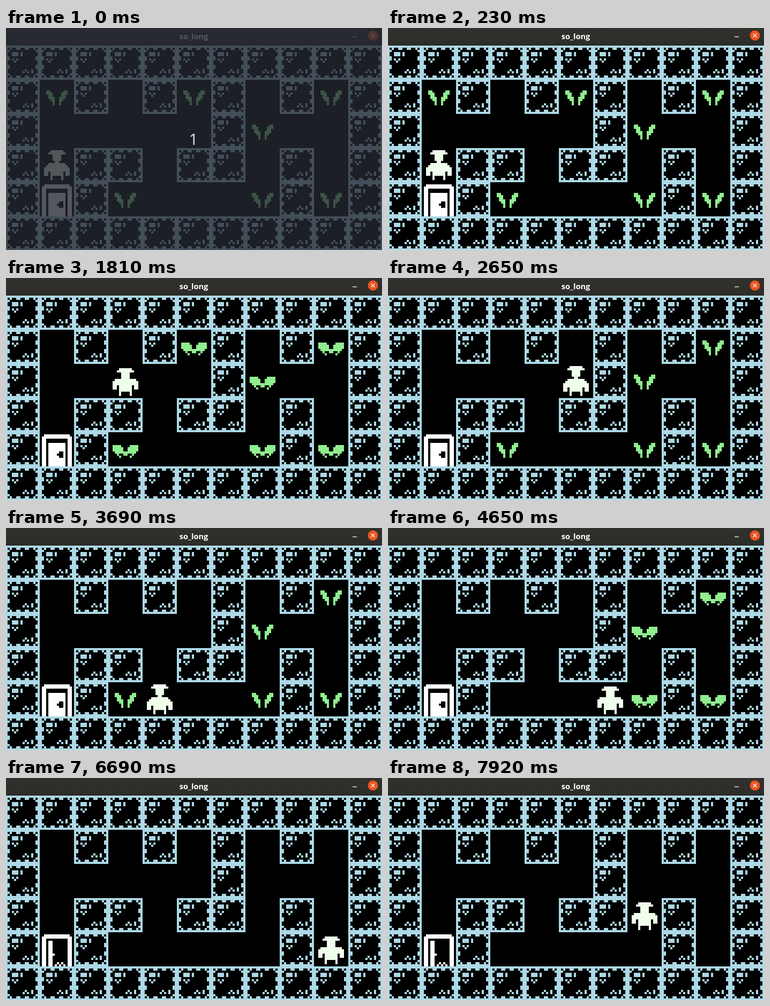
An HTML page with a canvas that plays this animation: 702 by 416 pixels, repeating every 8 s.

```html
<!DOCTYPE html>
<html lang="en">
<head>
<meta charset="utf-8">
<title>so_long</title>
<style>
  html, body { margin: 0; width: 702px; height: 416px; overflow: hidden; background: #000; }
  #stage { position: relative; width: 702px; height: 416px; overflow: hidden; }
  #stage > * { position: absolute; }
  canvas { left: 0; top: 0; }
  #bar { left: 0; top: 0; width: 702px; height: 33px; background: linear-gradient(#32312d, #2c2c29); }
  #title { left: 0; top: 5px; width: 701px; text-align: center; color: #fff;
    font: bold 14.6px/20px "Open Sans", "Noto Sans", sans-serif; }
  #controls { left: 640px; top: 0; }
  #dim { inset: 0; background: rgba(36, 40, 49, .78); }
  #count { left: 0; top: 188px; width: 700px; text-align: center; color: #d6d8da;
    font: 29px/40px "Noto Sans", sans-serif; }
</style>
</head>
<body>
<div id="stage">
  <canvas width="702" height="416"></canvas>
  <div id="bar"></div>
  <div id="title">so_long</div>
  <svg id="controls" width="62" height="33" fill="none" stroke="#fff">
    <path d="M7 16.5h8" stroke-width="1.3"/>
    <circle cx="45" cy="14" r="9.5" fill="#e95420" stroke="none"/>
    <path d="M41.5 10.5l7 7m0-7l-7 7" stroke-width="1.3"/>
  </svg>
  <div id="dim"></div>
  <div id="count">1</div>
</div>
<script>
const LOOP = 8000, TILE = 64, PX = 4, SIZE = TILE / PX, LEFT = -1, TOP = 33, FLAP = 129.6;
const ctx = document.querySelector('canvas').getContext('2d');
const dim = document.getElementById('dim');
const count = document.getElementById('count');

// 1 wall, C collectible, P player, E exit
const level = [
  '11111111111',
  '1C101C101C1',
  '1000001C001',
  '1P110110101',
  '1E1C000C1C1',
  '11111111111',
];
const find = symbol => level.flatMap((line, row) =>
  [...line].flatMap((cell, col) => cell === symbol ? [{ col, row }] : []));
const same = (a, b) => a.col === b.col && a.row === b.row;

const walls = find('1'), items = find('C'), [exit] = find('E');

const moves = 'UUDRRRRUDLDDLRRRRUURRUDDDUULLD';
const heading = { U: [0, -1], D: [0, 1], L: [-1, 0], R: [1, 0] };
const path = find('P');
for (const key of moves) {
  const { col, row } = path[path.length - 1];
  const [dx, dy] = heading[key];
  path.push({ col: col + dx, row: row + dy });
}

// Walking pace: moves made by a given time, even between these points
const pace = [[0, 0], [380, 1], [1120, 3], [2645, 9], [4120, 14], [6600, 25], [7910, 30]];

function movesMade(t) {
  if (t < pace[1][0]) return 0;
  const next = pace.findIndex(([time]) => time > t);
  if (next < 0) return moves.length;
  const [t0, n0] = pace[next - 1], [t1, n1] = pace[next];
  return Math.floor(n0 + (n1 - n0) * (t - t0) / (t1 - t0));
}

const box = (x, y, w = 1, h = 1) => ctx.fillRect(x * PX, y * PX, w * PX, h * PX);
const bar = (half, y, h = 1) => box(SIZE / 2 - half, y, half * 2, h);
function pair(x, y, w = 1, h = 1) {
  box(x, y, w, h);
  box(SIZE - x - w, y, w, h);
}

function at({ col, row }, color, paint, state) {
  ctx.setTransform(1, 0, 0, 1, LEFT + col * TILE, TOP + row * TILE);
  ctx.fillStyle = color;
  paint(state);
}

function wall() {
  const last = SIZE - 1;
  pair(0, 0, 1, SIZE);
  bar(SIZE / 2, 0);
  bar(SIZE / 2, last);
  for (let k = 2; k < last - 1; k++) {
    if (k % 4 !== 1 && k % 4 !== 2) continue;
    box(k, 1);
    box(k, last - 1);
    pair(1, k);
  }
  box(3, 3, 3, 2);
  box(7, 3, 1, 2);
  for (const x of [3, 5]) box(x, 6);
  box(4, 7);
  box(9, 11);
  for (const x of [8, 10]) box(x, 12);
  box(12, 11, 1, 2);
}

function door(open) {
  bar(6, 1);
  bar(7, 2);
  pair(1, 3, 2, 13);
  if (open) {
    box(4, 4, 2, 12);
    box(6, 10);
    for (let x = 7; x < 12; x++) box(x, 14 + x % 2);
  } else {
    bar(4, 5, 11);
    ctx.fillStyle = '#000';
    box(9, 9, 2, 3);
    box(8, 10);
  }
}

function wings(open) {
  if (open) {
    pair(2, 6, 4, 3);
    pair(6, 7, 1, 2);
    bar(5, 9);
    pair(4, 10);
    bar(1, 10);
    pair(5, 11);
  } else {
    pair(3, 5, 1, 2);
    pair(4, 5, 1, 4);
    pair(5, 6, 1, 4);
    pair(6, 8, 1, 4);
  }
}

function player(crouch) {
  const d = crouch ? 1 : 0;
  bar(3, 1 + d);
  bar(4, 2 + d);
  bar(2, 3 + d, 3);
  if (!crouch) {
    bar(1, 6);
    bar(4, 7);
  }
  bar(5, 8 - d);
  bar(6, 9 - d, 2);
  pair(2, 11 - d, 2, 2);
  bar(3, 11 - d, 2 + d);
  pair(5, 13, 1, 2);
}

function draw(t) {
  const crouch = t > 400 && Math.floor((t - 918) / FLAP) % 2 === 0;
  const visited = path.slice(0, movesMade(t) + 1);
  const left = items.filter(item => !visited.some(spot => same(spot, item)));

  ctx.resetTransform();
  ctx.fillStyle = '#000';
  ctx.fillRect(0, 0, 702, 416);
  for (const spot of walls) at(spot, '#add8e6', wall);
  at(exit, '#fff', door, left.length === 0);
  for (const spot of left) at(spot, '#90ee90', wings, crouch);
  at(visited[visited.length - 1], '#f0ffec', player, crouch);

  dim.style.opacity = t < 40 ? 1 : t < 130 ? 0.6 : t < 230 ? 0.25 : 0;
  count.style.opacity = t < 40 ? 1 : 0;
}

const start = performance.now();
function tick() {
  draw((performance.now() - start) % LOOP);
  requestAnimationFrame(tick);
}
tick();
</script>
</body>
</html>
```
